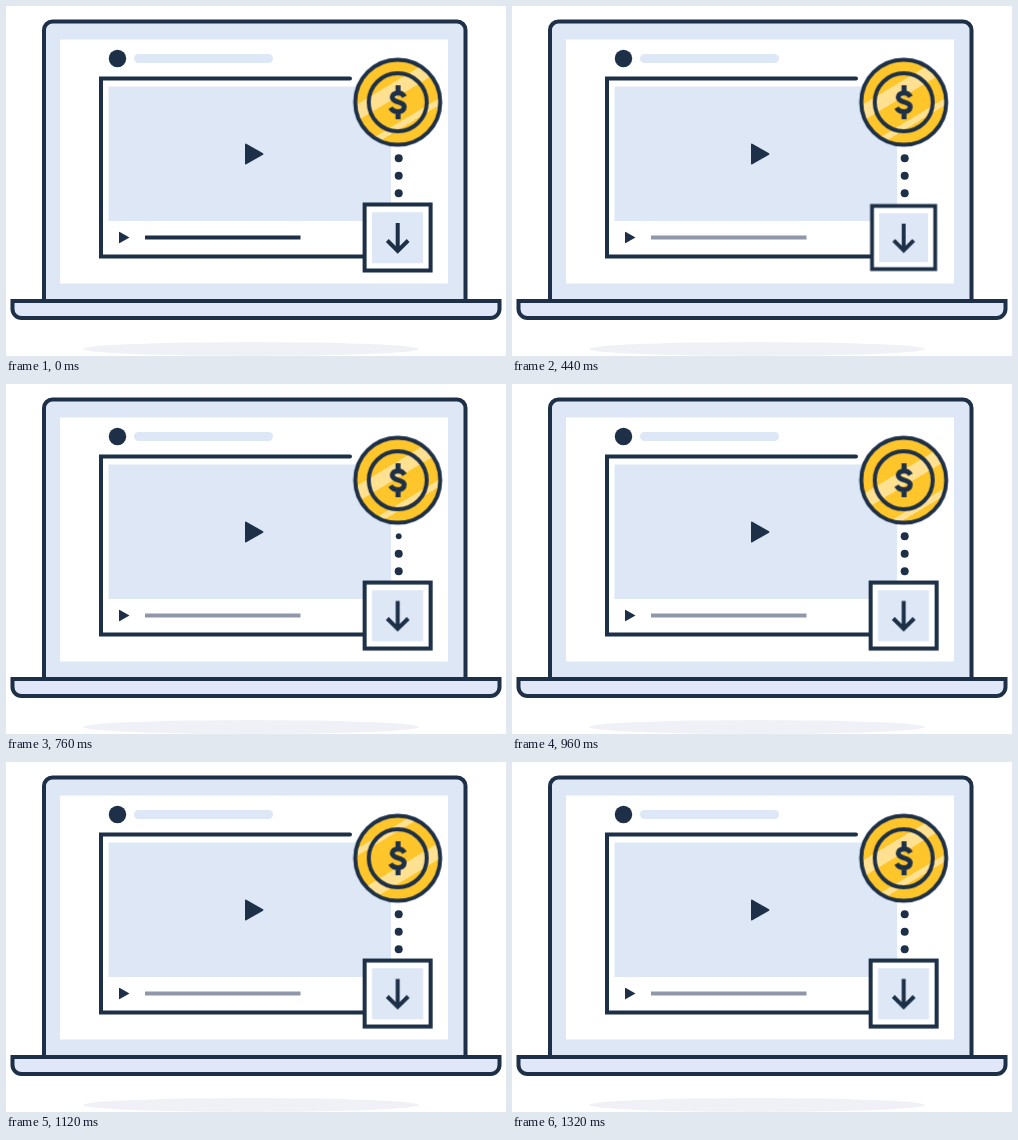
Animation of 500 by 350 pixels, one loop 1920 ms. Source, as an HTML page without scripts:

```html
<!DOCTYPE html>
<html lang="en">
<head>
<meta charset="utf-8">
<title>Pay and download</title>
<style>
  html, body { margin: 0; width: 100%; height: 100%; overflow: hidden; background: #fff; }
  svg { display: block; width: 100vw; height: 100vh; }

  .ink { fill: #1d3047; }
  .line { fill: none; stroke: #1d3047; stroke-width: 4; }
  .pale { fill: #dde7f6; }
  .white { fill: #fff; }
  .gold { fill: #ffc62b; }
  .shine { fill: #ffe191; }

  .progress, .button, .dot, .sweep { animation: 1920ms infinite; }
  .button, .dot { transform-box: fill-box; transform-origin: center; }

  .progress { stroke: #9097ab; animation-name: fade; }
  .button { animation-name: press; }
  .dot { animation-name: blink; }
  .dot:nth-child(2) { animation-delay: 80ms; }
  .dot:nth-child(3) { animation-delay: 160ms; }
  .sweep { animation-name: sweep; }

  @keyframes fade {
    0%, 6.25% { stroke: #1d3047; animation-timing-function: steps(4); }
    14.58%, 100% { stroke: #9097ab; }
  }
  @keyframes press {
    0%, 14.58% { transform: scale(1); animation-timing-function: steps(4); }
    22.91% { transform: scale(.957); animation-timing-function: steps(3); }
    29.16% { transform: scale(1.075); animation-timing-function: steps(3); }
    35.41%, 100% { transform: scale(1); }
  }
  @keyframes blink {
    0%, 25% { transform: scale(1); animation-timing-function: steps(3); }
    31.25% { transform: scale(.74); animation-timing-function: steps(2); }
    35.41%, 100% { transform: scale(1); }
  }
  @keyframes sweep {
    0%, 35.41% { transform: translateY(0); animation-timing-function: steps(7); }
    50% { transform: translateY(10px); animation-timing-function: steps(4); }
    58.33% { transform: translateY(27px); animation-timing-function: steps(5); }
    68.75%, 100% { transform: translateY(74px); }
  }
</style>
</head>
<body>
<svg viewBox="0 0 500 350">
  <defs>
    <clipPath id="face"><circle r="42"/></clipPath>
    <g id="bands" class="shine">
      <rect x="-50" y="-19" width="100" height="14"/>
      <rect x="-50" y="18" width="100" height="6"/>
    </g>
  </defs>

  <ellipse cx="245" cy="343" rx="168" ry="7" fill="#f0f1f6"/>

  <!-- laptop -->
  <path class="line" style="fill:#dde7f6" d="M38 295V24a8.5 8.5 0 0 1 8.500-8.500H451a8.500 8.500 0 0 1 8.500 8.500V295Z"/>
  <rect class="white" x="54" y="33.500" width="388" height="244"/>
  <path class="line" style="fill:#dfe7f9" d="M6.500 295H493.500V303a9 9 0 0 1-9 9H15.500a9 9 0 0 1-9-9Z"/>

  <!-- video window -->
  <circle class="ink" cx="111.500" cy="52.500" r="8.700"/>
  <rect class="pale" x="128" y="48" width="139" height="9" rx="4.500"/>
  <rect class="pale" x="102.500" y="80.500" width="282.500" height="134.500"/>
  <path class="line" stroke-linecap="round" d="M344 72.500H95V250.500H360"/>
  <path class="ink" d="M239 138.500q0-1.500 1.300-.8L257 147.200q1 .8 0 1.600L240.300 158.300q-1.300.7-1.300-.8Z"/>
  <path class="ink" d="M113 226.500q0-1 .8-.5L123.500 231.500 113.800 237q-.8.500-.8-.5Z"/>
  <path class="progress" stroke-width="4" d="M139 231.500H294.500"/>

  <!-- signal from button to coin -->
  <g class="ink">
    <circle class="dot" cx="392.700" cy="187.300" r="4"/>
    <circle class="dot" cx="392.700" cy="169.800" r="4"/>
    <circle class="dot" cx="392.700" cy="152.300" r="4"/>
  </g>

  <g class="button">
    <rect class="line" style="fill:#fff" x="358.600" y="198.500" width="66" height="66"/>
    <rect class="pale" x="366" y="206.200" width="51" height="51"/>
    <path class="line" d="M391.700 217V245M381.300 234.500L391.700 244.900L402.100 234.500"/>
  </g>

  <g transform="translate(391.700 96.200)">
    <circle class="gold" r="42.500"/>
    <g clip-path="url(#face)">
      <g transform="rotate(-31)">
        <g class="sweep">
          <use href="#bands"/>
          <use href="#bands" y="-74"/>
        </g>
      </g>
    </g>
    <circle class="line" r="42.500"/>
    <circle class="line" r="29"/>
    <path class="line" style="stroke-width:5" d="M6.800-5.500C5.300-8.300 3-9.300 .4-9.300C-3.400-9.300-5.500-7.300-5.500-4.900C-5.500 1.300 6.500-1.600 6.500 4.600C6.500 7.700 3.800 9.500 .3 9.500C-3 9.500-5.600 8.200-7.200 5.500M.3-17V-10M.3 10V17"/>
  </g>
</svg>
</body>
</html>
```
